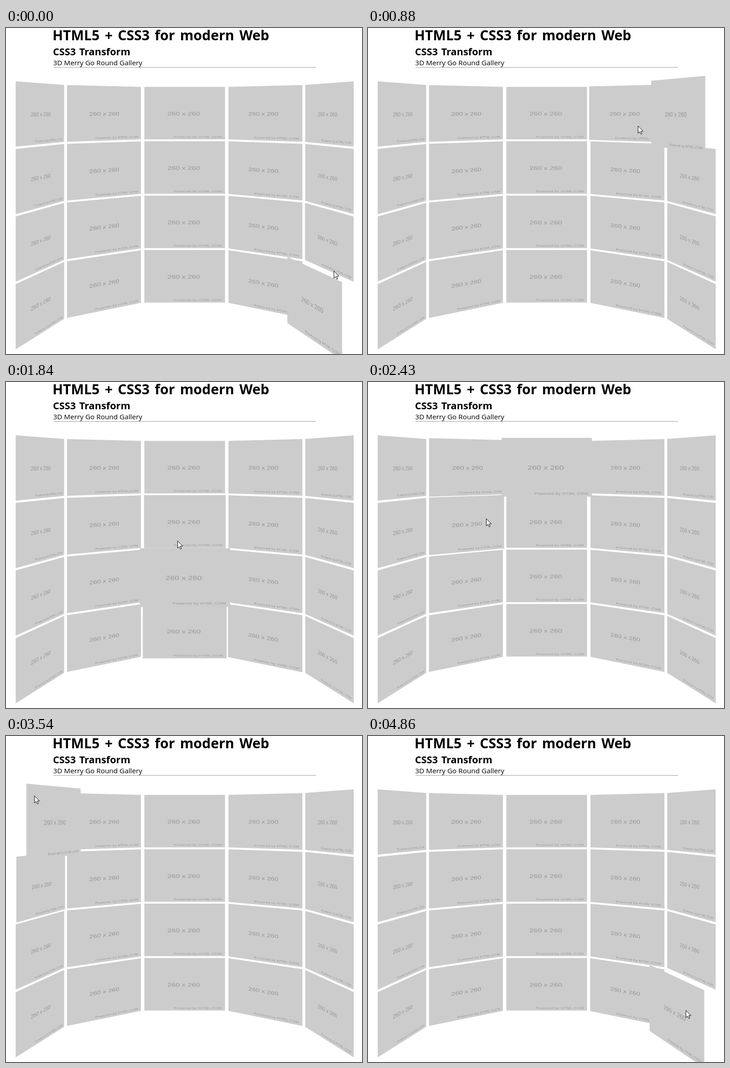
Write an HTML page that moves like this. It is 781 px wide and 717 px high and loops after 4940 ms.

```html
<!DOCTYPE html>
<html lang="en">
<head>
<meta charset="utf-8">
<title>3D Merry Go Round Gallery</title>
<style>
  html, body { margin: 0; width: 100%; height: 100%; overflow: hidden; background: #fff; }
  #wall {
    position: absolute; left: 0; top: 0; width: 781px; height: 717px; overflow: hidden;
    perspective: 1440px; perspective-origin: 391.8px 179.5px;
  }
  .tile {
    position: absolute; left: 261.8px; top: 49.5px; width: 260px; height: 260px;
    background: #ccc; color: #969696; font-family: "Liberation Sans", Arial, sans-serif; white-space: nowrap;
  }
  .tile span { position: absolute; left: 0; width: 254px; top: 118px; text-align: center; font-size: 24px; line-height: 30px; }
  .tile small { position: absolute; right: 10px; top: 239px; font-size: 13px; line-height: 16px; letter-spacing: .7px; }
  svg { position: absolute; left: 0; top: 0; }
  text { font-family: "Open Sans", "Noto Sans", sans-serif; }
</style>
</head>
<body>
<div id="wall"></div>
<svg width="781" height="717">
  <text x="102" y="27" font-size="30.2" font-weight="700" word-spacing="3.5">HTML5 + CSS3 for modern Web</text>
  <text x="103" y="60" font-size="21.7" font-weight="700" word-spacing="2">CSS3 Transform</text>
  <text x="103.5" y="81.5" font-size="15.3">3D Merry Go Round Gallery</text>
  <path d="M104 86.5H680" stroke="#999"/>
  <path id="cursor" d="M.5 .5V16.5L4 13L6.5 18.5L9 17.5L6.5 12H11.5Z" fill="#fff" stroke="#000"/>
</svg>
<script>
const LOOP = 4940, FRAMES = 67, STEP = LOOP / FRAMES, FADE = 400;
const RADIUS = 285, DEPTH = 1440, LIFT = 33, GROW = .17;
const WIDTH = 177, HEIGHT = 115.5, PITCH = 119.6, TOP = -50.5;
const CENTER = { x: 391.8, y: 179.5 };

// Turning points of the pointer: time, x, y
const path = [
  [0, 719, 534], [520, 700, 258], [840, 655, 200], [880, 594, 211], [1190, 535, 500],
  [1400, 535, 570], [1680, 415, 487], [1840, 377, 351], [2100, 350, 185], [2330, 300, 190],
  [2600, 190, 500], [2950, 118, 602], [3280, 62, 262], [3540, 62, 131], [3900, 380, 78],
  [4130, 622, 100], [4200, 634, 304], [4360, 632, 570], [4860, 696, 604]
];

const wall = document.getElementById('wall');
const cursor = document.getElementById('cursor');
const columnAngle = col => (col - 2) * Math.PI / 5;

const tiles = Array.from({ length: 20 }, (_, i) => {
  const el = document.createElement('div');
  el.className = 'tile';
  el.innerHTML = '<span>260 x 260</span><small>Powered by HTML.COM</small>';
  wall.append(el);
  return { el, col: i % 5, row: Math.floor(i / 5), visits: [] };
});

// Path point by index, repeating with every loop
function knot(i) {
  const n = path.length, [t, x, y] = path[(i + n) % n];
  return [t + Math.floor(i / n) * LOOP, x, y];
}

// Smooth curve through the turning points
function pointerAt(t) {
  const i = path.findLastIndex(p => p[0] <= t);
  const [before, a, b, after] = [-1, 0, 1, 2].map(k => knot(i + k));
  const span = b[0] - a[0], u = (t - a[0]) / span, v = 1 - u;
  return [1, 2].map(k => {
    const slopeA = (b[k] - before[k]) / (b[0] - before[0]) * span;
    const slopeB = (after[k] - a[k]) / (after[0] - a[0]) * span;
    return a[k] * v * v * (1 + 2 * u) + b[k] * u * u * (1 + 2 * v) + slopeA * u * v * v - slopeB * u * u * v;
  });
}

// Tile under a screen point, found by casting a ray onto the column's plane
function tileAt([px, py]) {
  const x = px - CENTER.x, side = Math.abs(x);
  const ring = side < 92 ? 0 : side < 261.5 ? 1 : 2;
  const angle = columnAngle(2 + ring);
  const scale = (RADIUS + (DEPTH - RADIUS) * Math.cos(angle)) / (side * Math.sin(angle) + DEPTH * Math.cos(angle));
  const row = Math.floor(((py - CENTER.y) * scale - TOP) / PITCH);
  const col = 2 + Math.sign(x) * ring;
  return tiles.find(tile => tile.col === col && tile.row === row);
}

// Note when the pointer enters and leaves each tile
for (let t = 0, last; t < LOOP; t += 5) {
  const tile = tileAt(pointerAt(t));
  if (tile && tile !== last) tile.visits.push({ start: t });
  if (tile) tile.visits.at(-1).end = t + 5;
  last = tile;
}

// The CSS "ease" curve, cubic-bezier(.25, .1, .25, 1)
function ease(p) {
  if (p <= 0) return 0;
  if (p >= 1) return 1;
  let lo = 0, hi = 1, u;
  for (let i = 0; i < 14; i++) {
    u = (lo + hi) / 2;
    if (.75 * u * (1 - u) + u ** 3 < p) lo = u; else hi = u;
  }
  return .3 * u * (1 - u) ** 2 + 3 * u * u * (1 - u) + u ** 3;
}

function hoverAmount({ visits }, t) {
  const amounts = visits.flatMap(({ start, end }) => [t, t + LOOP].map(now =>
    ease((Math.min(now, end) - start) / FADE) * (1 - ease((now - end) / FADE))));
  return Math.max(0, ...amounts);
}

function placeTile(tile, t) {
  const k = hoverAmount(tile, t), angle = columnAngle(tile.col);
  const r = RADIUS - LIFT * k, s = (1 + GROW * k) / 260;
  const x = r * Math.sin(angle), z = RADIUS - r * Math.cos(angle);
  const y = TOP + HEIGHT / 2 + PITCH * tile.row;
  tile.el.style.transform =
    `translate3d(${x}px,${y}px,${z}px) rotateY(${-angle}rad) scale(${WIDTH * s},${HEIGHT * s})`;
  tile.el.style.zIndex = Math.round(k * 1000);
}

const began = performance.now();
function draw() {
  const elapsed = performance.now() - began;
  const t = Math.floor((elapsed + 8) / STEP) % FRAMES * STEP;
  tiles.forEach(tile => placeTile(tile, t));
  cursor.setAttribute('transform', `translate(${pointerAt(t).map(Math.round)})`);
  requestAnimationFrame(draw);
}
draw();
</script>
</body>
</html>
```
